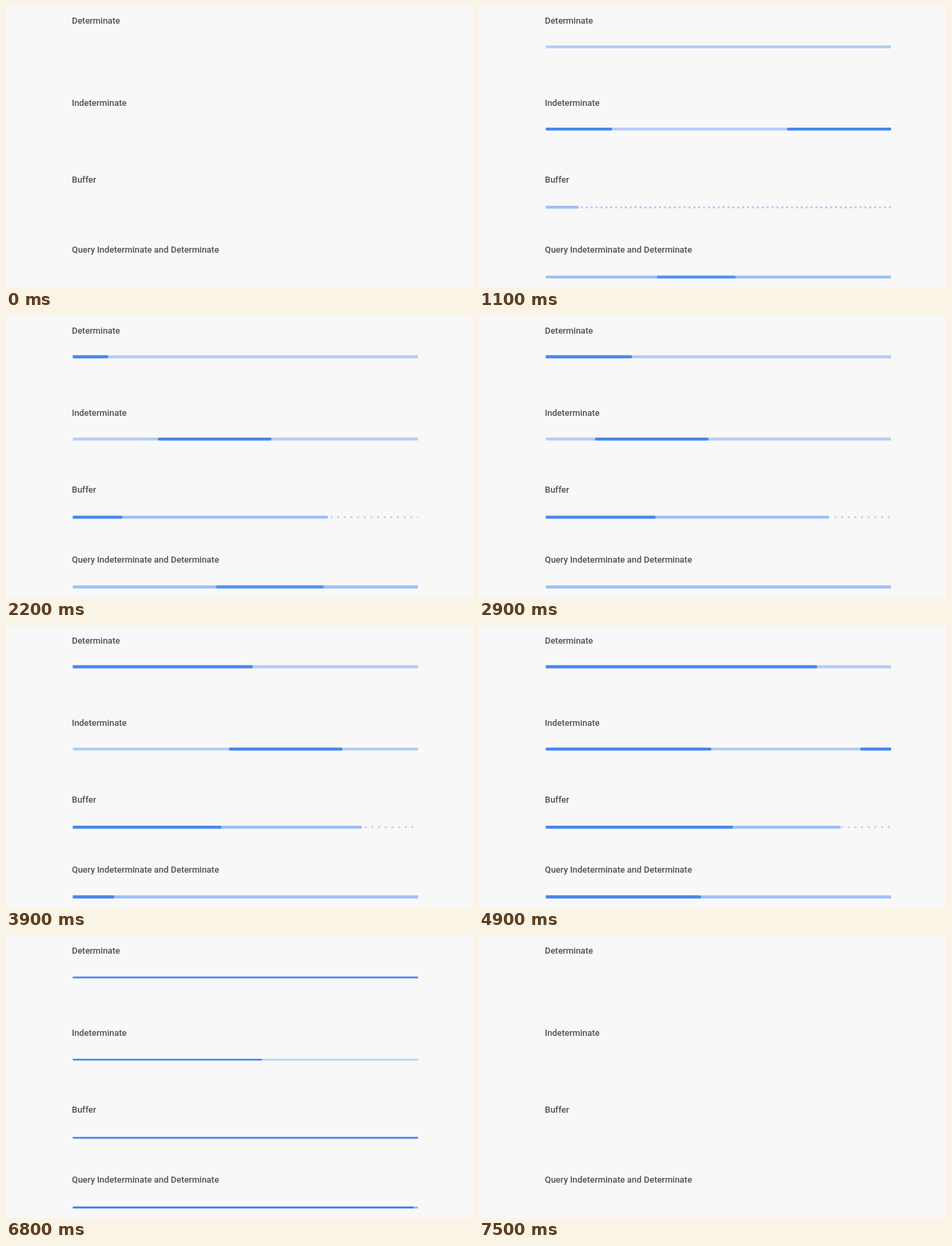
Animation of 688x415 px, one loop 7600 ms. Source, as an HTML page with a canvas:

```html
<!DOCTYPE html>
<html lang="en">
<head>
<meta charset="utf-8">
<title>Linear progress indicators</title>
<style>
  html, body { margin: 0; width: 100%; height: 100%; overflow: hidden; background: #f8f8f8; }
  canvas, svg { position: absolute; left: 0; top: 0; width: 688px; height: 415px; display: block; }
  text { font: 450 12.92px Roboto, Arial, sans-serif; fill: #505050; }
</style>
</head>
<body>
<canvas id="stage"></canvas>
<svg viewBox="0 0 688 415">
  <text x="97" y="26">Determinate</text>
  <text x="97" y="147">Indeterminate</text>
  <text x="97" y="260">Buffer</text>
  <text x="97" y="363">Query Indeterminate and Determinate</text>
</svg>
<script>
const LOOP = 7600, STEP = 100, LEFT = 98.5, RIGHT = 607, WIDTH = RIGHT - LEFT, THICK = 4.8;
const FILL = '#4687f0', TRACK = '#b5cdf5', READY = '#9fbff7', QUERY = '#5095f6', DOT = '#b7cff8';

const canvas = document.getElementById('stage');
const ctx = canvas.getContext('2d');
const ratio = window.devicePixelRatio || 1;
canvas.width = 688 * ratio;
canvas.height = 415 * ratio;
ctx.scale(ratio, ratio);

const part = (t, from, to) => Math.min(1, Math.max(0, (t - from) / (to - from)));
const sine = p => (1 - Math.cos(Math.PI * p)) / 2;

// Straight runs between [time, share] points.
function follow(points, t) {
  let value = points[0][1];
  for (let i = 1; i < points.length; i++) {
    const [t0, v0] = points[i - 1], [t1, v1] = points[i];
    if (t >= t0) value = v0 + (v1 - v0) * part(t, t0, t1);
  }
  return value;
}

const loaded = [[700, 0], [1100, .095], [2200, .739], [2900, .821], [4900, .854], [6000, 1]];
const played = [[1100, 0], [2200, .143], [2900, .318], [6100, .676], [6700, 1]];
const starts = [350, 960, 1780, 2556, 3330, 3995, 4550, 5606, 6400];

// A sweep's front leads its back by a lag; later sweeps are longer.
function sweep(t, start, lag, time) {
  return [part(t, start + lag, start + lag + time), part(t, start, start + time)];
}

// Bars rise from, and sink back to, their lower edge.
const openness = t => part(t, 500, 1150) * (1 - part(t, 6500, 7250));

function row(bottom, scale, draw) {
  const height = THICK * scale, top = bottom - height;
  const bar = (from, to, color) => {
    if (to <= 0 || from >= 1 || to <= from) return;
    const a = from <= 0 ? LEFT - 5 : LEFT + WIDTH * from;
    const b = to >= 1 ? RIGHT + 5 : LEFT + WIDTH * to;
    ctx.fillStyle = color;
    ctx.beginPath();
    ctx.roundRect(a, top, b - a, height, Math.min(2, height / 2));
    ctx.fill();
  };
  ctx.save();
  ctx.beginPath();
  ctx.rect(LEFT, top, WIDTH, height);
  ctx.clip();
  draw(bar, top + height / 2);
  ctx.restore();
}

// The dots spread out while drifting slowly to the left.
function dots(t, from, y, scale) {
  const grow = part(t, 1100, 2100);
  const pitch = 7.2 + 2.6 * grow;
  const radius = (1.9 - .3 * grow) * scale;
  const anchor = RIGHT - .0049 * (t - 2200);
  ctx.fillStyle = DOT;
  for (let x = anchor + Math.ceil((RIGHT - anchor) / pitch) * pitch; x > from; x -= pitch) {
    ctx.beginPath();
    ctx.arc(x, y, radius, 0, 7);
    ctx.fill();
  }
}

function draw(t) {
  ctx.clearRect(0, 0, 688, 415);
  const scale = openness(t);
  if (t < 700 || scale <= 0) return;

  row(62.4, scale, bar => {
    bar(0, 1, TRACK);
    const done = sine(part(t, 1050, 6600));
    if (done > .002) bar(0, done, FILL);
  });

  row(183.5, scale, bar => {
    bar(0, 1, TRACK);
    for (const start of starts) bar(...sweep(t, start, start < 4500 ? 240 : 437, 730), FILL);
  });

  row(298.5, scale, (bar, mid) => {
    const ready = follow(loaded, t);
    if (ready < 1) dots(t, LEFT + WIDTH * ready, mid, scale);
    bar(0, ready, READY);
    bar(0, follow(played, t), FILL);
  });

  row(401, scale, bar => {
    bar(0, 1, READY);
    for (let k = 0; k < 3; k++) {
      const [back, front] = sweep(t, 693 + 578 * k, 137 + 25 * k, 600);
      bar(1 - front, 1 - back, QUERY);
    }
    bar(0, sine(part(t, 2974, 7089)), FILL);
  });
}

function tick() {
  const t = performance.now() % LOOP;
  draw(Math.floor(t / STEP) * STEP);
  requestAnimationFrame(tick);
}
tick();
</script>
</body>
</html>
```
